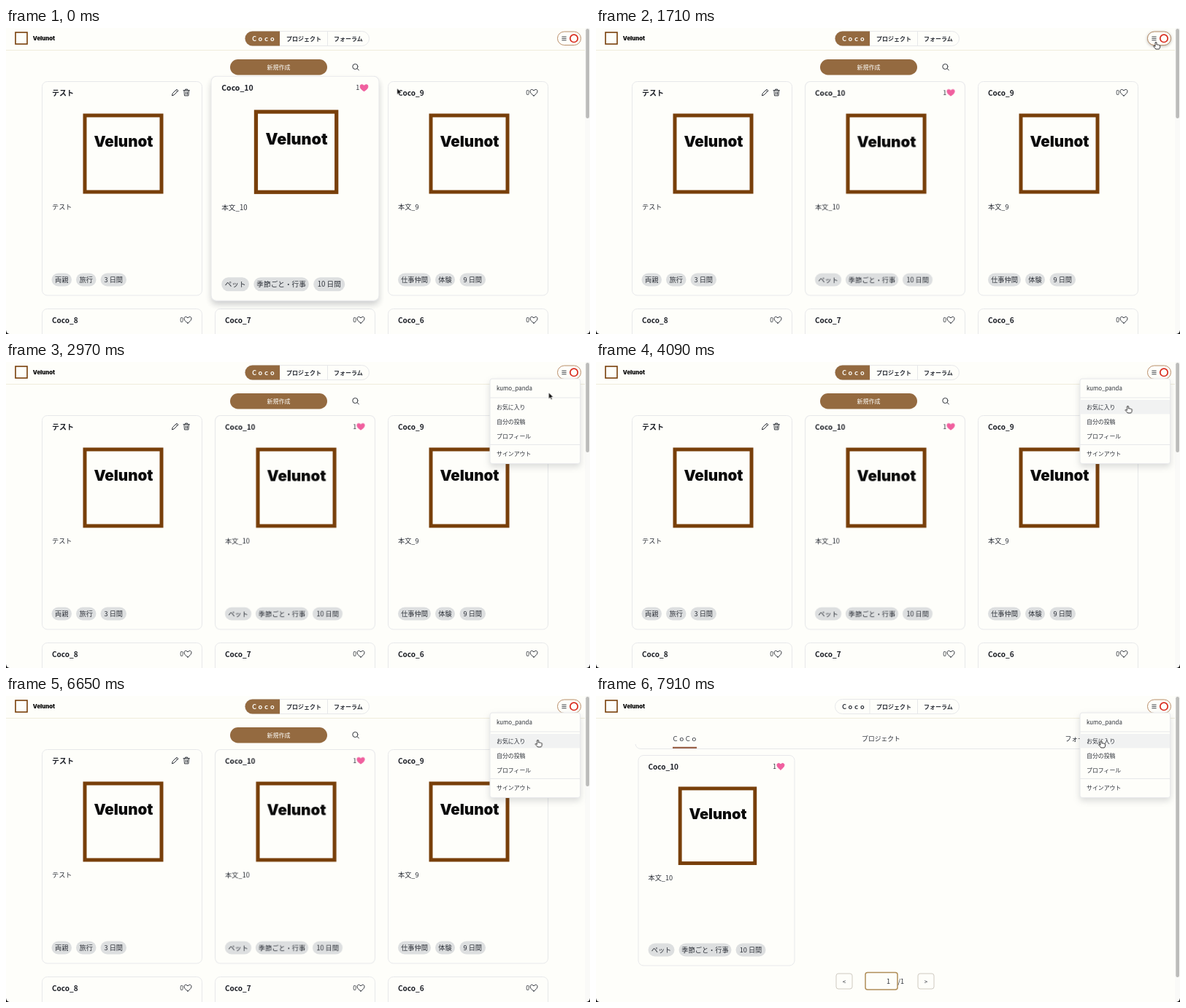
These frames come from a looping animation (800x420 px, 8 s). An HTML page:

```html
<!DOCTYPE html>
<html lang="ja">
<head>
<meta charset="utf-8">
<title>Coco</title>
<style>
html, body { margin: 0; width: 100%; height: 100%; overflow: hidden; background: #fefefa; }
svg { display: block; width: 800px; height: 420px; font-family: "Noto Sans CJK JP", "Noto Sans CJK", "Noto Sans", sans-serif; fill: #2c3038; }
.brand { font-family: Inter, sans-serif; font-weight: 900; fill: #0c0c0c; text-anchor: middle; }
.mid { text-anchor: middle; }
.end { text-anchor: end; }
.white { fill: #fefefa; }
.bold { font-weight: 600; fill: #1c1f26; }
.nav { font-weight: 600; }
.edge { fill: #fefefa; stroke: #e7e8ea; }
.line { fill: none; stroke: #30343c; stroke-linecap: round; stroke-linejoin: round; }
.pale { fill: none; stroke: #e7e8ea; }
.brown { fill: #946a40; }
.lift { transform-origin: 396px 220px; animation: settle 8s infinite; }
.shade { fill: #fefefa; filter: drop-shadow(0 5px 4px rgba(60, 65, 80, .25)); animation: fade 8s infinite; }
.home, .saved, .menu, .hover, .hand, .arrow, .glow { animation: 8s step-end infinite; }
.home { animation-name: home; }
.saved { animation-name: saved; }
.menu { animation-name: menu; }
.hover { animation-name: hover; }
.hand { animation-name: hand; }
.arrow { animation-name: arrow; }
.glow { animation-name: glow; }
.cursor { animation: move 8s infinite; }
@keyframes settle { 0% { transform: scale(1.05); } 2.6%, 100% { transform: none; } }
@keyframes fade { 0% { opacity: 1; } 2.6%, 100% { opacity: 0; } }
@keyframes home { 0% { visibility: visible; } 89%, 100% { visibility: hidden; } }
@keyframes saved { 0% { visibility: hidden; } 89%, 100% { visibility: visible; } }
@keyframes menu { 0% { opacity: 0; } 25.5%, 100% { opacity: 1; } }
@keyframes hover { 0% { opacity: 0; } 40%, 100% { opacity: 1; } }
@keyframes glow { 0% { opacity: 0; } 11% { opacity: 1; } 34.8%, 100% { opacity: 0; } }
@keyframes hand { 0% { opacity: 0; } 11% { opacity: 1; } 34.8% { opacity: 0; } 40%, 100% { opacity: 1; } }
@keyframes arrow { 0% { opacity: 1; } 11% { opacity: 0; } 34.8% { opacity: 1; } 40%, 100% { opacity: 0; } }
@keyframes move {
  0% { transform: translate(535px, 83px); animation-timing-function: linear; }
  3.25% { transform: translate(719px, 42px); animation-timing-function: ease-in-out; }
  13%, 33% { transform: translate(767px, 19px); animation-timing-function: ease-in; }
  37.125% { transform: translate(743.5px, 42px); animation-timing-function: ease-out; }
  43%, 95% { transform: translate(728.5px, 60px); animation-timing-function: ease-in-out; }
  98.5%, 100% { transform: translate(692px, 61px); }
}
</style>
</head>
<body>
<svg id="stage" viewBox="0 0 800 420"></svg>
<script>
const BRAND = "Velunot";
const text = (x, y, size, s, cls = "") => `<text x="${x}" y="${y}" font-size="${size}" class="${cls}">${s}</text>`;
const box = (x, y, w, h, r, cls, extra = "") => `<rect x="${x}" y="${y}" width="${w}" height="${h}" rx="${r}" class="${cls}" ${extra}/>`;
const path = (d, cls, extra = "") => `<path d="${d}" class="${cls}" ${extra}/>`;

const emblem = (x, y, side, weight) =>
  box(x, y, side, side, 0, "", `fill="none" stroke="#783f0a" stroke-width="${weight}"`);

const heart = (x, y, liked) => path(
  `M${x} ${y + 4.5}C${x - 9} ${y - 1} ${x - 4} ${y - 7} ${x} ${y - 2.5}C${x + 4} ${y - 7} ${x + 9} ${y - 1} ${x} ${y + 4.5}Z`,
  "line", liked ? 'style="fill:#f0609f;stroke:#f0609f"' : "");

const likes = (x, y, n) => text(x - 6, y + 3.2, 8.6, n, "end") + heart(x, y, n > 0);

const ownerTools = (x, y) =>
  path(`M${x} ${y + 4}l.8 -2.8l5.6 -5.6l2 2l-5.6 5.6zm5.2 -7l2 2`, "line") +
  path(`M${x + 15.5} ${y - 2.8}h8.4m-5.7 0v-1.6h3v1.6m-4.7 0l.5 7.2h5.4l.5 -7.2m-3.9 2v3.4m2 -3.4v3.4`, "line");

const chip = ([x, w, label], y) =>
  box(x, y - 9, w, 18, 9, "", 'fill="#dddfe0"') + text(x + w / 2, y + 3.5, 9.2, label, "mid");

function card(x, y, { w = 219, h = 293.5, title, body, chips, count }) {
  const k = w / 219;
  return box(x, y, w, h, 7, "edge") +
    text(x + 13.5, y + 19.3, 10, title, "bold") +
    (count === undefined ? ownerTools(x + 178, y + 15) : likes(x + 199.5 * k, y + 15, count)) +
    (body ? emblem(x + 58.5 * k, y + 46.5 * k, 105 * k, 5 * k) +
      text(x + 111.5 * k, y + 89.5 * k, 20.5 * k, BRAND, "brand") +
      text(x + 13.5, y + 175.5 * k, 9.2, body) +
      chips.map(c => chip([x + c[0], c[1], c[2]], y + h - 21.5)).join("") : "");
}

const favourite = {
  title: "Coco_10", body: "本文_10", count: 1,
  chips: [[13.5, 36, "ペット"], [55.5, 72, "季節ごと・行事"], [133.5, 41, "10 日間"]]
};

const header =
  path("M0 30.5H793", "pale", 'style="stroke:#f0eddc"') +
  emblem(13, 6, 16, 1.6) + text(52, 16.8, 7.7, BRAND, "brand") +
  box(327.5, 4.5, 170, 20, 10, "edge") +
  path("M375 4.5v20M440.5 4.5v20", "pale") +
  text(352.5, 17.5, 8.2, "Ｃｏｃｏ", "mid nav") +
  text(408, 17.5, 8, "プロジェクト", "mid nav") +
  text(469, 17.5, 8, "フォーラム", "mid nav") +
  box(755.5, 5, 32, 18.5, 9.2, "glow", 'style="filter:drop-shadow(0 1px 2px #a9a5a0)"') +
  box(755.5, 5, 32, 18.5, 9.2, "edge", 'style="stroke:#b98e68"') +
  path("M761.8 12h5.4m-5.4 2.4h5.4m-5.4 2.4h5.4", "line", 'stroke-width=".9"') +
  '<circle cx="778" cy="14.3" r="5.2" fill="none" stroke="#d92a1c" stroke-width="1.7"/>';

const home = `<g class="home">
  ${path("M375 4.5h-37.5a10 10 0 0 0 0 20H375z", "brown")}
  ${text(352.5, 17.5, 8.2, "Ｃｏｃｏ", "mid nav white")}
  ${box(307, 43, 133, 21.5, 10.7, "brown")}
  ${text(373.5, 56.8, 8, "新規作成", "mid white")}
  ${path("M481.3 55.8l2 2.2M482 53a3.6 3.6 0 1 1 -7.2 0a3.6 3.6 0 1 1 7.2 0", "line")}
  ${card(49.5, 73.5, { title: "テスト", body: "テスト",
    chips: [[13, 27.5, "両親"], [46.5, 27.5, "旅行"], [80, 35.5, "3 日間"]] })}
  ${card(523.5, 73.5, { title: "Coco_9", body: "本文_9", count: 0,
    chips: [[13.5, 45, "仕事仲間"], [64.5, 27, "体験"], [98, 35.5, "9 日間"]] })}
  ${[8, 7, 6].map((n, i) => card(49.5 + 237 * i, 385.5, { title: "Coco_" + n, count: 0 })).join("")}
  <g class="lift">${box(286.5, 73.5, 219, 293.5, 7, "shade")}${card(286.5, 73.5, favourite)}</g>
</g>`;

const saved = `<g class="saved">
  ${path("M54 66q1 6.5 8 6.5H738q7 0 8 -6.5", "pale")}
  ${box(105, 69.8, 33, 2.2, 0, "", 'fill="#9a6248"')}
  ${text(121.5, 62.2, 8.6, "ＣｏＣｏ", "mid")}
  ${text(390.5, 62.2, 8.8, "プロジェクト", "mid")}
  ${text(642.5, 62.2, 8.8, "フォーラム")}
  ${card(58, 81.5, { ...favourite, w: 214, h: 288.5 })}
  ${box(329, 381, 22, 21, 3, "edge", 'style="stroke:#cfcac0"')}
  ${box(369, 379.5, 44, 23.5, 3, "edge", 'style="stroke:#b08d58;stroke-width:1.5"')}
  ${box(441, 381, 22, 21, 3, "edge", 'style="stroke:#cfcac0"')}
  ${text(340, 394.6, 8, "&lt;", "mid")}${text(452, 394.6, 8, "&gt;", "mid")}
  ${text(400.5, 394.8, 9.2, "1", "mid")}${text(413.5, 394.8, 9.2, "/1")}
</g>`;

const menuItems = [["kumo_panda", 39.2], ["お気に入り", 64.6], ["自分の投稿", 84.6], ["プロフィール", 104.6], ["サインアウト", 129.4]];
const menu = `<g class="menu">
  ${box(663, 23, 123.5, 116.5, 3, "edge", 'style="filter:drop-shadow(0 4px 4px rgba(60,65,80,.18))"')}
  ${box(663.5, 52, 122.5, 19.5, 0, "hover", 'fill="#f1f2f2"')}
  ${path("M663 49h123.5M663 113.5h123.5", "pale")}
  ${menuItems.map(([label, y]) => text(672, y, 7.9, label)).join("")}
</g>`;

const scroller = box(793, 0, 7, 420, 0, "", 'fill="#fafaf8"') +
  box(794.3, 1, 4.7, 123, 2.3, "home", 'fill="#bcbcba"') +
  box(794.3, 1, 4.7, 385, 2.3, "saved", 'fill="#bcbcba"');

const corners = path("M0 414.5q.5 5 5 5.5H0zM800 414.5q-.5 5 -5 5.5h5z", "", 'fill="#111"');

const cursor = `<g class="cursor" stroke-linejoin="round">
  ${path("M0 0v8.4l2 -1.8l1.3 3l1.4 -.6l-1.3 -2.9h2.7z", "arrow", 'fill="#111" stroke="#fff" stroke-width=".5"')}
  ${path("M-1 1q1 -1.6 2 0v3q1 -.8 1.7 .2q1 -.6 1.6 .4q1.5 -.4 1.5 1.2q0 2.8 -1.4 4.2h-4.6q-1 -1.8 -3.4 -3.8q0 -1.6 2.6 .2z", "hand", 'fill="#fff" stroke="#222" stroke-width=".9"')}
</g>`;

document.getElementById("stage").innerHTML = header + home + saved + scroller + menu + corners + cursor;
</script>
</body>
</html>
```
